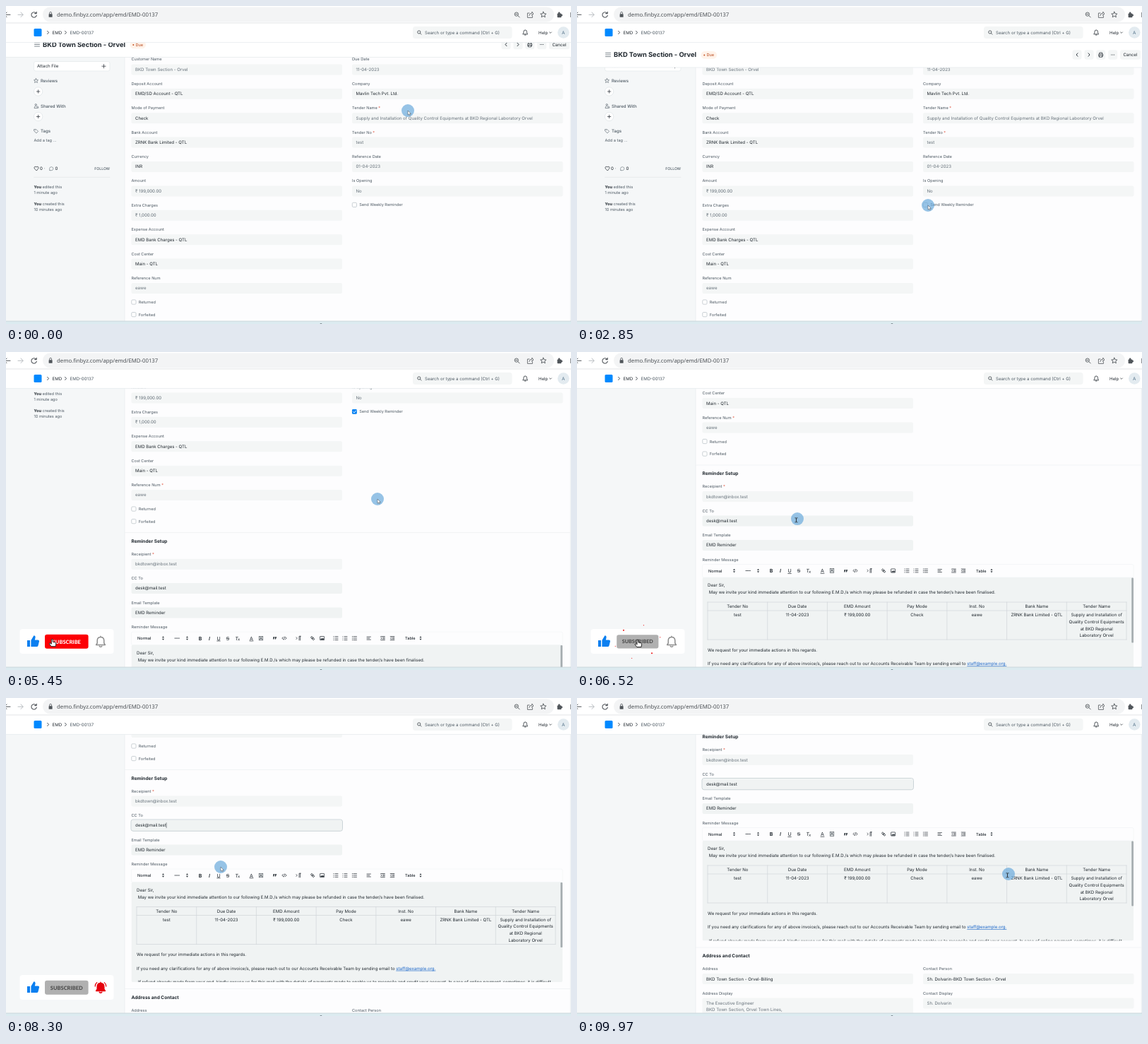
Animation of 800x450 px, one loop 10 s. Source, as an HTML page:

```html
<!DOCTYPE html>
<html lang="en">
<head>
<meta charset="utf-8">
<title>Deposit form</title>
<style>
html, body { margin: 0; width: 100%; height: 100%; overflow: hidden; background: #fff; }
svg { display: block; width: 800px; height: 450px; font-family: Inter, sans-serif; }
text { text-rendering: geometricPrecision; }
.line { fill: none; stroke-linecap: round; stroke-linejoin: round; }
</style>
</head>
<body>
<svg id="stage" viewBox="0 0 800 450"></svg>
<script>
const INK = '#20282f', LABEL = '#4d5963', GREY = '#66717a', FIELD = '#f4f6f6', BLUE = '#0a84f5';
const SIZE = 6.08, SMALL = 5.62;

const el = (parent, name, attrs = {}, text) => {
  const node = document.createElementNS('http://www.w3.org/2000/svg', name);
  for (const k in attrs) node.setAttribute(k, attrs[k]);
  if (text) node.textContent = text;
  parent.append(node);
  return node;
};
const group = parent => el(parent, 'g');
const rect = (g, x, y, width, height, fill, rx = 0, more) =>
  el(g, 'rect', { x, y, width, height, fill, rx, ...more });
const circle = (g, cx, cy, r, fill, more) => el(g, 'circle', { cx, cy, r, fill, ...more });
const line = (g, d, stroke = INK, width = 0.7, more) =>
  el(g, 'path', { d, stroke, 'stroke-width': width, class: 'line', ...more });
// y is the middle of the capitals
const text = (g, x, y, str, fill = INK, size = SIZE, more) =>
  el(g, 'text', { x, y: y + size * 0.364, fill, 'font-size': size, ...more }, str);
const bold = { 'font-weight': 700 }, semi = { 'font-weight': 500 }, mid = { 'text-anchor': 'middle' };
const show = (node, on) => node.setAttribute('visibility', on ? 'visible' : 'hidden');
const move = (node, x, y, rest = '') => node.setAttribute('transform', `translate(${x} ${y}) ${rest}`);

const svg = document.getElementById('stage');
rect(svg, 0, 0, 800, 450, '#f5f7f8');

// Scrolling page
const page = group(svg);
rect(page, 168, -20, 631, 1000, '#fdfdfe');
line(page, 'M168 -20V980M799.3 -20V980', '#e9edef', 0.8);
for (const y of [452.5, 762.5]) line(page, `M168 ${y}H799`, '#eff2f3', 0.8);

const editStars = [];
function field(x, y, label, value, flags = '') {
  const lab = text(page, x, y, label, LABEL, SMALL);
  if (/[*+]/.test(flags)) {
    const star = el(lab, 'tspan', { fill: '#e0533d' }, ' *');
    if (flags.includes('+')) editStars.push(star);
  }
  rect(page, x, y + 7, 298.5, flags.includes('t') ? 40 : 15, flags.includes('d') ? '#f0f3f3' : FIELD, 2);
  return text(page, x + 5.5, y + 14.2, value, flags.includes('g') ? GREY : INK);
}
function check(x, y, label) {
  rect(page, x + 0.3, y - 3.1, 6.2, 6.2, '#fff', 1.4, { stroke: '#b5bdc3', 'stroke-width': 0.7 });
  text(page, x + 10.2, y, label, LABEL, SMALL);
}
const fields = (x, rows) => rows.forEach((r, i) => field(x, 75.4 + 34.4 * i, ...r));

fields(177.5, [
  ['Customer Name', 'BKD Town Section - Orvel', 'g'],
  ['Deposit Account', 'EMD/SD Account - QTL'],
  ['Mode of Payment', 'Check'],
  ['Bank Account', 'ZRNK Bank Limited - QTL'],
  ['Currency', 'INR'],
  ['Amount', '₹ 199,000.00', 'g+'],
  ['Extra Charges', '₹ 1,000.00', 'g'],
  ['Expense Account', 'EMD Bank Charges - QTL'],
  ['Cost Center', 'Main - QTL'],
  ['Reference Num', 'eawe', 'g+']
]);
fields(490, [
  ['Due Date', '11-04-2023', 'g'],
  ['Company', 'Mavlin Tech Pvt. Ltd.'],
  ['Tender Name', 'Supply and Installation of Quality Control Equipments at BKD Regional Laboratory Orvel', 'g*'],
  ['Tender No', 'test', 'g*'],
  ['Reference Date', '01-04-2023', 'g'],
  ['Is Opening', 'No', 'g']
]);
check(177.5, 419, 'Returned');
check(177.5, 436.6, 'Forfeited');
check(490, 281.4, 'Send Weekly Reminder');
const ticked = group(page);
rect(ticked, 490, 278, 6.8, 6.8, BLUE, 1.4);
line(ticked, 'M491.6 281.5l1.4 1.4 2.4-2.8', '#fff', 0.9);

text(page, 177.5, 464.5, 'Reminder Setup', INK, 6.55, bold);
field(177.5, 482.6, 'Receipient', 'bkdtown@inbox.test', 'g*');
const ccText = field(177.5, 517, 'CC To', 'desk@mail.test', 'd');
const focus = rect(page, 177, 523, 299.5, 16.3, 'none', 3, { stroke: '#c6d0d3', 'stroke-width': 0.9 });
const caretX = 183.3 + ccText.getComputedTextLength();
const caret = line(page, `M${caretX} 527.7v7`, INK, 0.5);
field(177.5, 551.5, 'Email Template', 'EMD Reminder', 'd');
text(page, 177.5, 586, 'Reminder Message', LABEL, SMALL);

// Editor toolbar
rect(page, 177.5, 593, 610.5, 18.5, 'none', 2, { stroke: '#f3f5f6', 'stroke-width': 0.8 });
const TY = 602;
text(page, 186, TY, 'Normal', INK, SMALL, semi);
text(page, 565, TY, 'Table', INK, SMALL, semi);
for (const x of [222.5, 256.5, 587])
  el(page, 'path', { d: `M${x - 1.5} ${TY - 0.7}l1.5-2 1.5 2zM${x - 1.5} ${TY + 0.7}l1.5 2 1.5-2z`, fill: INK });
line(page, `M239 ${TY}h1.4m1.1 0h1.4m1.1 0h1.4`, INK, 0.8);
const glyph = (x, str, more) => text(page, x, TY, str, INK, 7, { ...mid, ...more });
glyph(275, 'B', bold);
glyph(288, 'I', { 'font-style': 'italic', 'font-weight': 600 });
glyph(301, 'U', { 'text-decoration': 'underline' });
glyph(314, 'S', { 'text-decoration': 'line-through' });
glyph(326.6, 'T', { 'font-style': 'italic' });
line(page, `M328.6 ${TY + 0.8}l2 2m0-2l-2 2`);
glyph(347.5, 'A');
line(page, `M345 ${TY + 3.8}h5`);
rect(page, 358.2, TY - 2.8, 5.6, 5.6, '#d9dddf', 0, { stroke: INK, 'stroke-width': 0.5 });
text(page, 361, TY, 'A', INK, 5, mid);
glyph(380.5, '”', { 'font-weight': 800, 'font-size': 11, y: TY + 6 });
line(page, `M392.6 ${TY - 1.6}l-1.8 1.6 1.8 1.6M395.4 ${TY - 1.6}l1.8 1.6-1.8 1.6M394.5 ${TY - 2}l-1 4`);
line(page, `M411 ${TY - 1.4}l1.3 1.4-1.3 1.4M415 ${TY + 2.8}v-5.6h2.4M416.6 ${TY + 2.8}v-5.6`);
for (const [x, y] of [[431.2, TY - 1.3], [433.6, TY - 1.1]])
  rect(page, x, y, 3.4, 2.3, 'none', 1.1, { stroke: INK, 'stroke-width': 0.8, transform: `rotate(40 434 ${TY})` });
rect(page, 444.6, TY - 2.6, 6, 5.2, 'none', 0.4, { stroke: INK, 'stroke-width': 0.7 });
el(page, 'path', { d: `M445 ${TY + 2}l1.6-2 1 1 1.2-1.6 1.6 2.6z`, fill: INK });
const bars = (x, w, lead) => [-2.4, 0, 2.4].forEach(d => {
  line(page, `M${x} ${TY + d}h${w}`);
  line(page, `M${x - 2.2} ${TY + d}h${lead}`);
});
bars(466, 4, 0.4); bars(479, 4, 0.1); bars(492.5, 4, 0.9);
line(page, `M511 ${TY - 2}h5.4M511 ${TY}h3.8M511 ${TY + 2}h5.4`);
for (const [x, d] of [[533.5, 0.6], [547, -0.6]])
  line(page, `M${x - 2.8} ${TY - 2.5}h5.6M${x} ${TY - 0.8}h2.8M${x} ${TY + 0.8}h2.8M${x - 2.8} ${TY + 2.5}h5.6` +
    `M${x - 2 - d} ${TY - 1}L${x - 2 + d} ${TY}L${x - 2 - d} ${TY + 1}`);

// Editor body
const clip = el(el(svg, 'defs'), 'clipPath', { id: 'body' });
rect(clip, 177.5, 611.5, 610.5, 141.5, '#000');
const body = el(page, 'g', { 'clip-path': 'url(#body)' });
rect(body, 177.5, 611.5, 610.5, 141.5, '#f0f3f3', 2);
rect(body, 785.2, 612, 2.8, 92, '#a8afb2', 1);
text(body, 185, 622.5, 'Dear Sir,');
text(body, 186.7, 632.5, 'May we invite your kind immediate attention to our following E.M.D./s which may please be refunded in case the tender/s have been finalised.');
const COL = 593 / 7;
line(body, 'M185 646.5H778M185 658.5H778M185 699.5H778', '#d0d5d8', 0.7);
for (let i = 0; i < 8; i++) line(body, `M${185 + COL * i} 646.5V699.5`, '#d0d5d8', 0.7);
[['Tender No', 'test'], ['Due Date', '11-04-2023'], ['EMD Amount', '₹ 199,000.00'], ['Pay Mode', 'Check'],
 ['Inst. No', 'eawe'], ['Bank Name', 'ZRNK Bank Limited - QTL'],
 ['Tender Name', 'Supply and Installation of', 'Quality Control Equipments', 'at BKD Regional', 'Laboratory Orvel']
].forEach(([head, ...rows], i) => {
  const x = 185 + COL * (i + 0.5);
  text(body, x, 652.5, head, INK, SIZE, mid);
  rows.forEach((row, k) => text(body, x, 664.5 + 9.75 * k, row, INK, SIZE, mid));
});
text(body, 185, 714, 'We request for your immediate actions in this regards.');
const help = text(body, 185, 733.5, 'If you need any clarifications for any of above invoice/s, please reach out to our Accounts Receivable Team by sending email to ');
el(help, 'tspan', { fill: '#1a66c9', 'text-decoration': 'underline' }, 'staff@example.org.');
text(body, 187, 753.2, 'If refund already made from your end, kindly excuse us for this mail with the details of payments made to enable us to reconcile and credit your account. In case of online payment, sometimes, it is difficult');

text(page, 177.5, 774.5, 'Address and Contact', INK, 6.55, bold);
field(177.5, 792.6, 'Address', 'BKD Town Section - Orvel-Billing');
field(490, 792.6, 'Contact Person', 'Sh. Dolvarin-BKD Town Section - Orvel');
field(177.5, 827, 'Address Display', 'The Executive Engineer', 'gt');
text(page, 183, 850, 'BKD Town Section, Orvel Town Lines,', GREY);
field(490, 827, 'Contact Display', 'Sh. Dolvarin', 'g');

// Sidebar
rect(page, 39.5, 78.5, 107.5, 13.5, '#fff', 2.5, { stroke: '#e3e8ea', 'stroke-width': 0.7 });
text(page, 44, 85.2, 'Attach File');
line(page, 'M138.5 82.6v5.2M135.9 85.2h5.2');
text(page, 49, 105.6, 'Reviews', LABEL, SIZE, semi);
line(page, 'M42.5 102.6l.9 2 2.1.2-1.6 1.5.5 2.2-1.9-1.1-1.9 1.1.5-2.2-1.6-1.5 2.1-.2z', LABEL, 0.6);
text(page, 49, 141.5, 'Shared With', LABEL, SIZE, semi);
line(page, 'M40 144.2q0-2.6 2.2-2.6t2.2 2.6zM44.6 141.7q1.4.3 1.4 2.5h-1M43.4 139.7a1.2 1.2 0 1 0-2.4 0a1.2 1.2 0 1 0 2.4 0', LABEL, 0.6);
text(page, 49, 177, 'Tags', LABEL, SIZE, semi);
line(page, 'M40 174.6h2.8l2.8 2.8-2.6 2.6-3-2.8zM41.4 176h.1', LABEL, 0.6);
for (const y of [121, 156.5]) {
  circle(page, 45.6, y, 6.2, '#fff', { stroke: '#dde3e6', 'stroke-width': 0.7 });
  line(page, `M45.6 ${y - 2.2}v4.4M43.4 ${y}h4.4`);
}
text(page, 39.5, 189.5, 'Add a tag ...', LABEL, SMALL);
line(page, 'M43 232.8l-2.6-2.6q-1-1.5.2-2.7 1.5-.9 2.4.6.9-1.5 2.4-.6 1.2 1.2.2 2.7z', INK, 0.7);
text(page, 48, 230, '0  ·');
line(page, 'M62 232.6q-1.2-2.4.2-4.2 2.2-1.6 4.2.2 1.4 2.2-.6 3.7-1.6.8-3.8.3z', GREY, 0.6);
text(page, 69.5, 230, '0');
text(page, 147, 230, 'FOLLOW', LABEL, 5.15, { 'text-anchor': 'end', ...semi });
line(page, 'M39.5 242.3H147', '#e3e7e9', 0.7);
[['edited', '1 minute', 255.5], ['created', '10 minutes', 279.5]].forEach(([verb, ago, y]) => {
  const t = text(page, 39.5, y, '', LABEL, SMALL);
  el(t, 'tspan', { 'font-weight': 700, fill: INK }, 'You');
  el(t, 'tspan', {}, ` ${verb} this`);
  text(page, 39.5, y + 8.6, `${ago} ago`, LABEL, SMALL);
});

// Page header
const head = group(svg);
rect(head, 0, 45, 800, 42, '#fff');
line(head, 'M0 87H800', '#e6eaec', 0.8);
line(head, 'M40.5 66.4h7M40.5 69h7M40.5 71.6h7', LABEL);
text(head, 52, 69, 'BKD Town Section - Orvel', INK, 9.36, bold);
const badge = (g, label, w) => {
  rect(g, 175.5, 64, w, 10.8, '#fff3ea', 5.4);
  circle(g, 180.3, 69.4, 1, '#c4501f');
  text(g, 183.5, 69.4, label, '#b8481c', SMALL);
};
function buttons(g, dx) {
  for (const x of [708, 725, 741.7, 758.7]) rect(g, x + dx - 6.5, 62.3, 13, 13.4, FIELD, 3);
  line(g, `M${709 + dx} 66.8l-2 2.2 2 2.2M${724 + dx} 66.8l2 2.2-2 2.2`, INK, 0.9);
  line(g, `M${739.8 + dx} 68v-2h3.8v2M${739.8 + dx} 71h-1v-3h5.8v3h-1M${739.8 + dx} 70h3.8v2.3h-3.8z`);
  for (const d of [-2, 0, 2]) circle(g, 758.7 + dx + d, 69, 0.55, INK);
}
const saved = group(head), dirty = group(head);
badge(saved, 'Due', 22.5);
buttons(saved, 0);
rect(saved, 769, 62.3, 29, 13.4, FIELD, 3);
text(saved, 783.4, 69, 'Cancel', INK, SIZE, mid);
badge(dirty, 'Not Saved', 40);
buttons(dirty, -8.8);
rect(dirty, 760, 62.3, 38, 13.4, BLUE, 3);
line(dirty, 'M765.6 71l.5-1.6 3-3 1.1 1.1-3 3z', '#fff', 0.6);
text(dirty, 772, 69, 'Update', '#fff', SIZE, semi);

// Navbar and browser bar
rect(svg, 0, 24, 800, 27.5, '#fff');
line(svg, 'M0 51.6H800', '#e6eaec', 0.8);
rect(svg, 39.5, 32, 11, 11, '#0089ff', 1.5);
line(svg, 'M58.6 35.4l1.9 2.1-1.9 2.1M83.6 35.4l1.9 2.1-1.9 2.1', INK, 0.8);
text(svg, 65.5, 37.5, 'EMD');
text(svg, 90.5, 37.5, 'EMD-00137', LABEL);
rect(svg, 576, 29, 140.5, 17, FIELD, 3.5);
circle(svg, 584.8, 37, 2.1, 'none', { stroke: INK, 'stroke-width': 0.7 });
line(svg, 'M586.4 38.6l1.6 1.6');
text(svg, 593, 37.5, 'Search or type a command (Ctrl + G)', LABEL);
line(svg, 'M732 39.6q1-.8 1-3.2 0-2.4 2.2-2.4t2.2 2.4q0 2.4 1 3.2zM734.3 41h1.8', INK, 0.8);
text(svg, 754, 37.5, 'Help');
line(svg, 'M769.6 37l1.4 1.4 1.4-1.4');
circle(svg, 789.3, 37.5, 8.2, '#e3ebf0');
text(svg, 789.3, 37.5, 'A', '#56748a', 6.4, mid);

rect(svg, 0, 0, 800, 24, '#fff');
rect(svg, 52, 1.5, 724, 21, '#f3f4f5', 10.5);
line(svg, 'M0 24H800', '#dcdfe1', 0.8);
line(svg, 'M-2 12.3H6M1 9l-3.2 3.3L1 15.6', '#50555a', 1);
line(svg, 'M17 12.3H24M21 9l3.2 3.3-3.2 3.3', '#b9bdc1', 1);
line(svg, 'M42.6 10.2a3.7 3.7 0 1 0 .7 3M43.2 8.2v2.4h-2.5', '#50555a', 1.1);
rect(svg, 60.6, 11.2, 5, 4.6, '#50555a', 0.6);
line(svg, 'M61.7 11v-1.2a1.4 1.4 0 0 1 2.8 0V11', '#50555a', 0.8);
text(svg, 72, 12.4, 'demo.finbyz.com/app/emd/EMD-00137', '#3f4449', 7.8, { 'font-family': "'Open Sans', sans-serif" });
circle(svg, 722.8, 11.6, 2.6, 'none', { stroke: '#50555a', 'stroke-width': 0.9 });
line(svg, 'M724.8 13.6l2.4 2.4M721.6 11.6h2.4', '#50555a', 0.9);
line(svg, 'M741 10h-2.6v6.4h7v-2M740.8 13.6q.6-3.6 4-3.6V8.2l2 2.8-2 2.6v-1.8', '#50555a', 0.8);
line(svg, 'M760.8 8.2l1.2 2.6 2.9.3-2.2 1.9.7 2.8-2.6-1.5-2.6 1.5.7-2.8-2.2-1.9 2.9-.3z', '#50555a', 0.9);
rect(svg, 780.6, 10.4, 5.8, 5.8, '#50555a', 0.8);
circle(svg, 783.2, 9.9, 1.3, '#50555a');
circle(svg, 786.7, 13.1, 1.3, '#50555a');
rect(svg, 799, 9, 1, 7, '#8b9094');

rect(svg, 0, 446, 800, 4, '#dcebf0');
line(svg, 'M0 446H800', '#c5d0d5', 0.8);
circle(svg, 446, 451, 1.8, '#46525a');

// Subscribe banner
const banner = group(svg);
rect(banner, 19.5, 392, 133, 35, '#fff', 4);
const thumb = el(banner, 'path', {
  d: 'M30 408h4v9h-4zM35.4 408l4-6.8q2.6 0 2.1 3.2l-.7 3h4.8q1.7.3 1.4 2l-1.5 6q-.5 1.6-2 1.6h-8.1z'
});
const button = group(banner);
const plate = rect(button, -30.8, -10, 61.6, 20, '#f00', 3);
const caption = text(button, 0, 0, 'SUBSCRIBE', '#fff', 7.5, {
  ...mid, 'font-family': 'Lato, sans-serif', 'font-weight': 800
});
const sparks = Array.from({ length: 6 }, (_, i) => circle(banner, 0, 0, i % 3 ? 0.6 : 1.1, '#ee2222'));
const bell = group(banner);
const bellShape = line(bell, 'M0-7.4V-6.2C-3.6-6.2-4.8-3.6-4.8-1V2.4L-6.4 4.8H6.4L4.8 2.4V-1C4.8-3.6 3.6-6.2 0-6.2M-1.7 6.8Q0 8.6 1.7 6.8', '#8d8d8d', 1.5);
const waves = line(bell, 'M-7.8-1.5Q-7.8-5-5.2-7M7.8-1.5Q7.8-5 5.2-7', '#e6000c', 1.2);
const hand = el(banner, 'path', {
  d: 'M-1 .6Q0-.6 1 .6V4l3.6.9q1.2.5 1 1.8L5 10.5H-1.2L-3.8 7q-.4-1.3 1-1.2L-1 7z',
  fill: '#fff', stroke: '#111', 'stroke-width': 0.9, 'stroke-linejoin': 'round'
});

// Pointer
const pointer = group(svg);
const halo = circle(pointer, 0, 0, 9, '#69aadb', { 'fill-opacity': 0.7 });
const arrow = el(pointer, 'path', {
  d: 'M0 0V6.2L1.5 4.9 2.4 7 3.4 6.5 2.5 4.5H4.4z', fill: '#fff', stroke: '#3b4650', 'stroke-width': 0.5
});
const beam = line(pointer, 'M-3.2-1.2h1.2q.5 0 .5.5v5q0 .5-.5.5h-1.2M.2-1.2H-1q-.5 0-.5.5v5q0 .5.5.5H.2', '#2b3237', 0.8);

// Motion
const clamp = p => Math.max(0, Math.min(1, p));
const ease = p => { p = clamp(p); return p * p * (3 - 2 * p); };
const at = (rows, t) => {
  const i = rows.findIndex(r => r[0] > t);
  if (i < 0) return rows[rows.length - 1].slice(1);
  if (!i) return rows[0].slice(1);
  const a = rows[i - 1], b = rows[i], p = ease((t - a[0]) / (b[0] - a[0]));
  return a.slice(1).map((v, k) => v + (b[k + 1] - v) * p);
};
const pulse = (t, start, span) => Math.sin(Math.PI * clamp((t - start) / span));

const LOOP = 10000, NOTCH = 58.5, EDIT = 3210, FOCUS = 6900, LIKE = 4800, SUB = 6330, RING = 7700;
const wheel = [4491, 4780, 5070, 5369, 5660, 7950, 8600];
const headPath = [[0, -14.5], [320, 0], [4491, 0], [4991, -42]];
const mousePath = [[0, 569, 148], [600, 530, 320], [1030, 508, 284], [1300, 503, 276], [2450, 497, 282],
  [3400, 497, 282], [4000, 526, 208], [5900, 526, 208], [6450, 312, 236], [7300, 311, 237],
  [7800, 304, 239], [8900, 304, 239], [9970, 611, 249]];
const bannerPath = [[3700, 60], [4200, 0], [9200, 0], [9600, 60]];
const handPath = [[4100, 75, 440], [4500, 41, 411], [5200, 41, 411], [5480, 66, 406], [5800, 86, 407],
  [7300, 86, 407], [7600, 134, 410], [7900, 134, 410], [8200, 150, 452]];

function draw(t) {
  move(page, 0, -NOTCH * wheel.reduce((sum, s) => sum + ease((t - s) / 200), 0));
  move(head, 0, at(headPath, t)[0]);
  const edited = t >= EDIT;
  show(saved, !edited);
  show(dirty, edited);
  show(ticked, edited);
  editStars.forEach(s => show(s, edited));
  show(focus, t >= FOCUS);
  show(caret, t >= FOCUS && (t - FOCUS) % 1060 < 530);

  move(pointer, ...at(mousePath, t));
  halo.setAttribute('r', 9 - 2.5 * (pulse(t, 2860, 200) + pulse(t, FOCUS - 100, 200)));
  const typing = (t > 6300 && t < 7800) || t > 9500;
  show(beam, typing);
  show(arrow, !typing);

  const drop = at(bannerPath, t)[0];
  move(banner, 0, drop);
  show(banner, drop < 60);
  thumb.setAttribute('fill', t < LIKE ? '#9a9a9a' : '#0b7ff0');
  const done = t >= SUB;
  caption.textContent = done ? 'SUBSCRIBED' : 'SUBSCRIBE';
  caption.setAttribute('fill', done ? '#4a4a4a' : '#fff');
  plate.setAttribute('fill', done ? '#b0b0b0' : t < LIKE ? '#d90410' : '#fc0005');
  move(button, 85.8, 409.8, `scale(${1 - 0.04 * pulse(t, SUB - 150, 600)})`);
  const blast = clamp((t - SUB) / 500);
  sparks.forEach((s, i) => {
    const a = i * Math.PI / 3 + 0.8, r = 0.5 + 0.6 * Math.sqrt(blast) + 0.06 * (i % 3);
    move(s, 86 + 33 * r * Math.cos(a), 410 + 26 * r * Math.sin(a));
    show(s, blast > 0 && blast < 1);
  });
  const ringing = t >= RING;
  bellShape.setAttribute('stroke', ringing ? '#e6000c' : '#8d8d8d');
  bellShape.setAttribute('style', `fill:${ringing ? '#e6000c' : 'none'}`);
  const swing = ringing ? 14 * Math.sin((t - RING) / 600 * Math.PI * 4) * (1 - clamp((t - RING) / 900)) : 0;
  move(bell, 134, 409.6, `rotate(${swing})`);
  show(waves, ringing && drop < 60);
  move(hand, ...at(handPath, t));
  show(hand, t > 4100 && t < 8200);
}
const start = performance.now();
function tick() {
  draw((performance.now() - start) % LOOP);
  requestAnimationFrame(tick);
}
draw(0);
requestAnimationFrame(tick);
</script>
</body>
</html>
```
